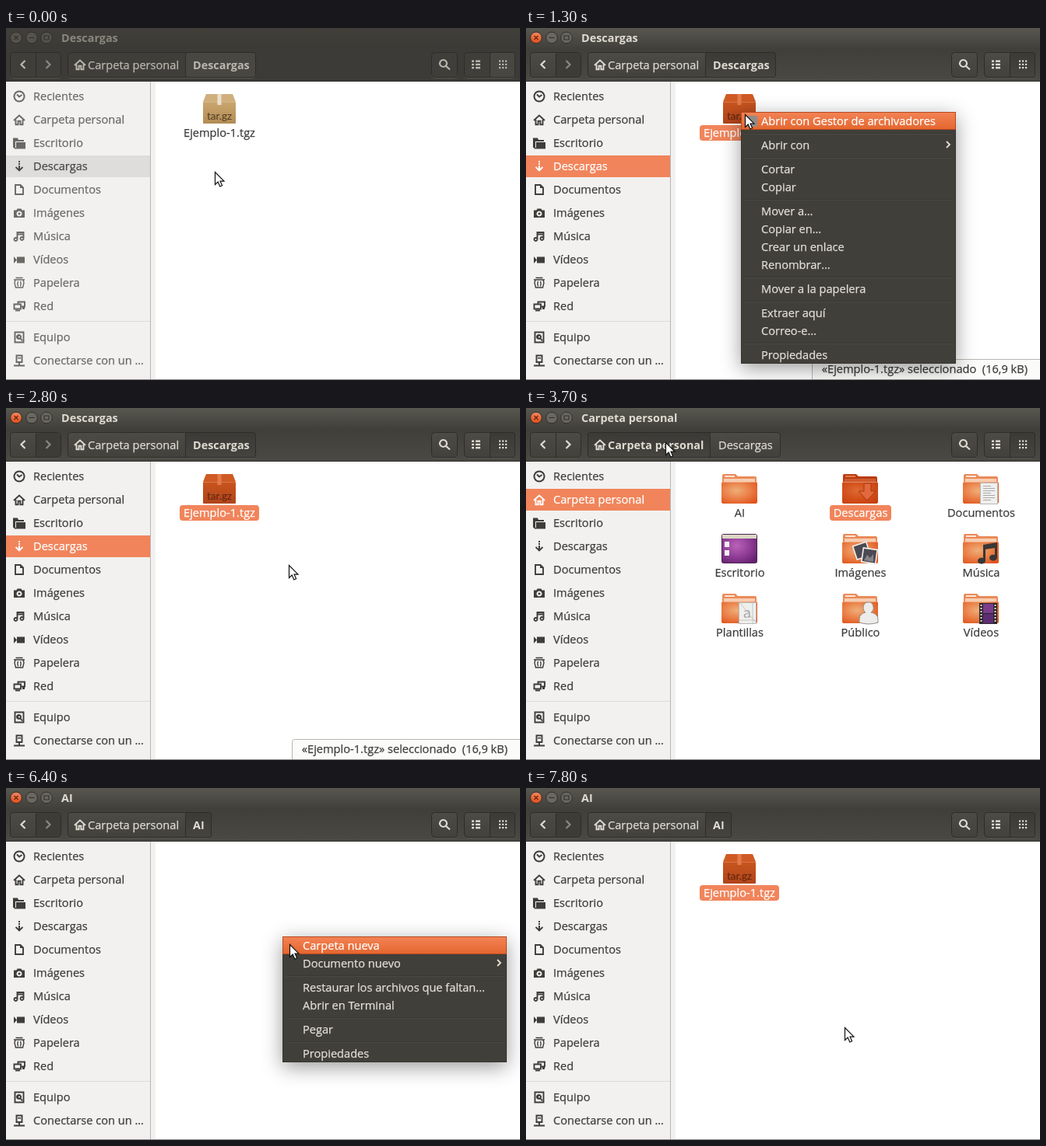
Write an HTML page that moves like this. It is 660 by 453 pixels and loops after 8000 ms.

```html
<!DOCTYPE html>
<html lang="es">
<head>
<meta charset="utf-8">
<title>Gestor de archivos</title>
<style>
html, body { margin: 0; width: 100%; height: 100%; overflow: hidden; background: #fff; }
svg { display: block; width: 660px; height: 453px; }
text { font: 14.6px "Open Sans", "Noto Sans", sans-serif; white-space: pre; stroke-width: .25; }
.b { font-weight: 700; font-size: 14.4px; stroke-width: 0; }
.m { text-anchor: middle; }
.e { text-anchor: end; }
.line { fill: none; stroke: currentColor; }
</style>
</head>
<body>
<svg viewBox="0 0 660 453" xmlns="http://www.w3.org/2000/svg">
  <defs id="defs"></defs>
  <g id="stage"></g>
</svg>
<script>
const LOOP = 8000, STEP = 100;
const DARK = '#3c3b37', ORANGE = '#f1845b';

// ---- helpers
const rect = (x, y, w, h, fill, more = '') =>
  `<rect x="${x}" y="${y}" width="${w}" height="${h}" fill="${fill}" ${more}/>`;
const path = (d, fill, more = '') => `<path d="${d}" fill="${fill}" ${more}/>`;
const line = (d, width = 2, more = '') => `<path class="line" d="${d}" stroke-width="${width}" ${more}/>`;
const text = (x, y, s, fill, cls = '') =>
  `<text x="${x}" y="${y}" fill="${fill}" stroke="${fill}" class="${cls}">${s}</text>`;
const at = (x, y, body, more = '') => `<g transform="translate(${x} ${y})" ${more}>${body}</g>`;
const stops = colors => colors.map((c, i) =>
  `<stop offset="${i / (colors.length - 1)}" stop-color="${c}"/>`).join('');
const grad = (id, ...colors) =>
  `<linearGradient id="${id}" x2="0" y2="1">${stops(colors)}</linearGradient>`;
const glowGrad = (id, ...colors) =>
  `<radialGradient id="${id}" cx=".42" cy=".4" r=".72">${stops(colors)}</radialGradient>`;

document.getElementById('defs').innerHTML =
  grad('title', '#58574f', '#403f3a') + grad('titleOff', '#403f3a', '#3b3a36') +
  grad('bar', '#403f3a', '#4a4943') + grad('btn', '#4c4b45', '#42413c') +
  grad('pressed', '#3b3a36', '#45443f') +
  grad('close', '#f58a63', '#dd4c1b') + grad('hot', '#f38355', '#e4662f') +
  grad('box', '#caa56e', '#b28c54') + grad('boxSel', '#c9551f', '#b0441a') +
  glowGrad('folder', '#f0ae79', '#ea824a', '#e0541c') +
  glowGrad('folderSel', '#de6a33', '#d4511c', '#c6410f') +
  glowGrad('desk', '#bb62b8', '#93409a', '#65206f');

// ---- sidebar: [label, row centre, stroked path, filled path]
const HOME = 'M1 9 8 2.5 15 9M3.5 8V14.2H6.6V9.8H9.4V14.2H12.5V8';
const PLACES = [
  ['Recientes', 88, 'M8 1.5a6.5 6.5 0 1 0 .01 0M5 5.5 8 8.5 11.5 6', ''],
  ['Carpeta personal', 118, HOME, ''],
  ['Escritorio', 148, '', 'M0 1.5H6L7 4H14V6H3V14H0ZM4 7H16V15.5H1.5V14H4Z'],
  ['Descargas', 178, 'M3.5 9 8 13.5 12.5 9', 'M7 1h2v2h-2zM7 4h2v2h-2zM7 7h2v6h-2z'],
  ['Documentos', 208, 'M3 2H9.5L13 5.5V14H3Z', 'M9 2V6H13Z'],
  ['Imágenes', 238, '', 'M1 4.5H4.5L5.5 2.5H10.5L11.5 4.5H15V14H1ZM8 5.5a3.5 3.5 0 1 0 .01 0ZM8 7.5a1.5 1.5 0 1 0 .01 0Z'],
  ['Música', 268, 'M5.5 12V3H13.5V10.5M5.5 5.5H13.5M3.5 10a2 2 0 1 0 .01 0M11.5 9a2 2 0 1 0 .01 0', ''],
  ['Vídeos', 298, '', 'M5 4.5H15V12.5H5ZM1 4 5 8.5 1 13Z'],
  ['Papelera', 328, 'M1 4H15M3.5 1.5H12.5M3 4 2 8 3.5 14H12.5L14 8 13 4M6.5 6Q5 9.5 6.5 12.5M9.5 6Q11 9.5 9.5 12.5', ''],
  ['Red', 358, 'M6.5 5V2.5H15V8.5H11M1.5 5.5H10V11.5H1.5Z', 'M3 12.5H9V14.5H3ZM12 9H15V12H12Z'],
  ['Equipo', 398, 'M2.5 1.5H13.5V14.5H2.5ZM9 9 12 12.5', 'M7.5 4a3.5 3.5 0 1 0 .01 0ZM8 6.5a1 1 0 1 0 .01 0Z'],
  ['Conectarse con un …', 428, 'M4.5 1.5H11.5V10H4.5ZM8 10V13.5M1 14.5H15', 'M6 4H10V5.5H6Z'],
];

function sidebar(active, focus) {
  let out = rect(0, 69, 192, 384, '#f2f1f0') + rect(185, 69, 1, 383, '#bab6b2') +
    rect(0, 377, 185, 1, '#dcdad8');
  for (const [label, y, stroke, fill] of PLACES) {
    const on = label === active;
    const color = !focus ? (on ? '#4a4845' : '#6b6966') : on ? '#fff' : '#3f3d3a';
    if (on) out += rect(0, y - 14, 185, 28, focus ? ORANGE : '#dfdddc');
    out += at(9, y - 8, line(stroke, label === 'Papelera' ? 1.4 : 1.9) +
      path(fill, 'currentColor', 'fill-rule="evenodd"'), `color="${color}"`);
    out += text(35, y + 5, label, color);
  }
  return out;
}

// ---- header
function group(x, w, focus, pressedX, pressedW) {
  return rect(x + .5, 32.5, w - 1, 32, 'none', 'rx="4" stroke="#59584f"') +
    rect(x + .5, 31.5, w - 1, 32, focus ? 'url(#btn)' : '#3f3e3a', 'rx="4" stroke="#2d2c29"') +
    (pressedW ? rect(pressedX + .5, 31.5, pressedW - 1, 32, focus ? 'url(#pressed)' : '#484741', 'rx="3" stroke="#2d2c29"') : '');
}

function header(place, focus) {
  const fg = focus ? '#dfdbd2' : '#bbb7ae', dim = '#8b887f';
  const home = place === 'Carpeta personal';
  let out = rect(0, 0, 660, 27, focus ? 'url(#title)' : 'url(#titleOff)') +
    rect(0, 27, 660, 42, focus ? 'url(#bar)' : DARK) + rect(0, 68, 660, 1, '#2f2e2b');
  [13, 33, 52].forEach((x, i) => {
    const hot = focus && !i;
    out += `<circle cx="${x}" cy="12.5" r="7.3" fill="${hot ? 'url(#close)' : focus ? '#69675f' : '#55534c'}" stroke="#2f2e2a"/>`;
    const mark = ['M-2.5-2.5 2.5 2.5M2.5-2.5-2.5 2.5', 'M-3.5 0H3.5', 'M-3-2.5H3V2.5H-3Z'][i];
    out += at(x, 12.5, line(mark, 1.2), `color="${hot ? '#6d2209' : '#33322e'}"`);
  });
  out += text(71, 18, place, focus ? '#dfdbd2' : '#8a867e', 'b');

  out += group(5, 66, focus) + rect(38, 32, 1, 31, '#2d2c29');
  if (!home && focus) out += rect(39, 32, 31, 31, '#3d3c37', 'rx="3"');
  out += at(0, 0, line('M24.5 42 19.5 47 24.5 52', 2.2), `color="${fg}"`) +
    at(0, 0, line('M51.5 42 56.5 47 51.5 52', 2.2), `color="${home ? fg : dim}"`);

  out += home ? group(79, 248, focus, 79, 158)
    : place === 'AI' ? group(79, 185, focus, 230, 34) : group(79, 242, focus, 230, 91);
  out += at(87, 39, line(HOME, 1.9), `color="${fg}"`) +
    text(105, 53, 'Carpeta personal', fg, home ? 'b' : '') +
    (home ? text(247, 53, 'Descargas', fg) : text(240, 53, place, fg, 'b'));

  out += group(546, 34, focus) + group(588, 66, focus, 621, 33);
  out += at(0, 0, line('M561.5 41a4.5 4.5 0 1 0 .01 0M565 49 570 53.5', 2.1), `color="${fg}"`);
  for (const y of [41.5, 45.8, 50]) {
    out += rect(598, y, 3, 2.4, fg) + rect(603, y, 6, 2.4, fg);
    for (const x of [633, 637, 641]) out += rect(x, y, 2.2, 2.2, fg);
  }
  return out;
}

// ---- icons
function label(cx, y, s, sel, half) {
  return (sel ? rect(cx - half, y - 15, half * 2, 20, ORANGE, 'rx="4"') : '') +
    text(cx, y, s, sel ? '#fff' : '#3c3c3c', 'm');
}
const glow = hover => hover ? 'style="filter:brightness(1.15)"' : '';

function archive(sel, hover) {
  const [top, front, tape, ink] = sel
    ? ['#d05a24', 'url(#boxSel)', '#e27a4c', '#5b2410'] : ['#d0af7d', 'url(#box)', '#eadfca', '#4d3c24'];
  return at(253, 85,
    path('M4 0H38L42 10H0Z', top) + rect(0, 10, 42, 28, front, 'rx="1"') +
    rect(0, 10, 42, 1, '#fff', 'opacity=".2"') + rect(18.5, 0, 5, 14, tape) +
    `<text x="21" y="33" class="m" fill="${ink}" style="font:13.5px Lato,sans-serif">tar.gz</text>`, glow(hover)) +
    label(274, 140, 'Ejemplo-1.tgz', sel, 51);
}

const page = rect(22.5, 11.5, 22, 27, '#efefee', 'stroke="#b9b7b4"');
const photo = (x, y, turn) => rect(-8, -9, 18, 18, '#4b4a52',
  `stroke="#f1efec" stroke-width="1.6" transform="translate(${x} ${y}) rotate(${turn})"`);
const rows = (n, f) => Array.from({ length: n }, (_, i) => f(i)).join('');
const EMBLEMS = {
  Descargas: path('M28 12H37V22H43L32 34 21 22H28Z', '#e2693d', 'stroke="#a8360c"'),
  Documentos: page + rows(7, i => rect(26, 15 + i * 3, i % 3 ? 15 : 10, 1, '#aaa')),
  'Imágenes': photo(24, 22, -18) + photo(34, 28, 8) + path('M28 34 32 27 36 31 40 26V36Z', '#85838a'),
  'Música': path('M26 14 44 11V31a5 4 0 1 1-3-4V18L29 20V35a5 4 0 1 1-3-4Z', '#383736'),
  Plantillas: page + `<text x="33" y="31" class="m" fill="#a5a3a0" style="font:20px Lato,sans-serif">a</text>` +
    path('M23 34H44M40 12V38M24 12 44 37', 'none', 'stroke="#c9c7c4"'),
  'Público': path('M33 11a6 7 0 0 1 4 13Q46 26 46 33V37Q34 41 22 37V33Q22 26 30 24A6 7 0 0 1 33 11Z', '#eeecea', 'stroke="#918e8b"'),
  'Vídeos': rect(21, 12, 23, 27, '#2b292b') + rect(26, 13, 13, 12, '#7b3c8c') + rect(26, 26, 13, 12, '#5d2c73') +
    rows(6, i => rect(22.5, 14 + i * 4, 2, 2, '#ddd') + rect(40.5, 14 + i * 4, 2, 2, '#ddd')),
};

function folder(name, cx, y, sel, hover) {
  let art;
  if (name === 'Escritorio') {
    art = rect(.5, .5, 45, 37, 'url(#desk)', 'rx="2" stroke="#4a2450"') + rect(1, 1, 44, 5, '#dcd8c4') +
      rect(4, 10, 6, 7, '#f3eef3') + rect(4, 21, 6, 7, '#f3eef3');
  } else {
    art = path('M1 37V2Q1 0 3 0H18L21 3H43Q45 3 45 5V37Z', sel ? '#b93c10' : '#ea8a58') +
      rect(4, 2, 13, 2, sel ? '#e57b4f' : '#fbe3d3') + rect(3, 6, 40, 6, sel ? '#d05a2c' : '#f8cdb0') +
      rect(0, 10, 46, 28, sel ? 'url(#folderSel)' : 'url(#folder)', 'rx="2"') +
      rect(1, 10, 44, 1, '#fff', 'opacity=".35"') + (EMBLEMS[name] || '');
  }
  return at(cx - 23.5, y, art, glow(hover)) + label(cx, y + 55, name, sel, name === 'AI' ? 13 : 39.5);
}

const FOLDERS = ['AI', 'Descargas', 'Documentos', 'Escritorio', 'Imágenes', 'Música', 'Plantillas', 'Público', 'Vídeos'];
const homeGrid = (selected, hover) => FOLDERS.map((name, i) =>
  folder(name, 274.5 + i % 3 * 155, 85 + Math.floor(i / 3) * 77, name === selected, name === hover)).join('');

function status(x, s) {
  return path(`M${x + .5} 453V429.5Q${x + .5} 426.5 ${x + 3.5} 426.5H661V453Z`, '#fbfbfa', 'stroke="#b9b6b2"') +
    text(644, 444, s, '#3c3c3c', 'e');
}

// ---- context menus: [label, row centre]
const FILE_MENU = { x: 276, y: 108, w: 276, h: 324, sub: 'Abrir con', seps: [135, 166, 220, 320, 351, 405], items: [
  ['Abrir con Gestor de archivadores', 120], ['Abrir con', 151], ['Cortar', 182], ['Copiar', 205],
  ['Mover a…', 236], ['Copiar en…', 259], ['Crear un enlace', 282], ['Renombrar…', 305],
  ['Mover a la papelera', 336], ['Extraer aquí', 367], ['Correo-e…', 390], ['Propiedades', 421]] };
const BLANK_MENU = { x: 355, y: 191, w: 288, h: 162, sub: 'Documento nuevo', seps: [241, 295, 326], items: [
  ['Carpeta nueva', 203], ['Documento nuevo', 226], ['Restaurar los archivos que faltan...', 257],
  ['Abrir en Terminal', 280], ['Pegar', 311], ['Propiedades', 342]] };

function menu({ x, y, w, h, sub, seps, items }, [px, py], opacity) {
  let out = rect(x + .5, y + .5, w - 1, h - 1, '#413f3a',
    'stroke="#35342f" style="filter:drop-shadow(0 6px 13px rgba(0,0,0,.4))"');
  for (const s of seps) out += rect(x + 4, s, w - 8, 1, '#393833') + rect(x + 4, s + 1, w - 8, 1, '#4a4943');
  for (const [name, cy] of items) {
    const hot = px >= x && Math.abs(cy - py) < 11.5;
    if (hot) out += rect(x + .5, cy - 11.5, w - 1, 22, 'url(#hot)', 'stroke="#b8491f"');
    out += text(x + 26, cy + 5, name, hot ? '#fff' : '#e3dfd6');
    if (name === sub) out += at(x + w - 12, cy - 1, line('M0-4 4 0 0 4', 1.8), 'color="#e3dfd6"');
  }
  if (x === FILE_MENU.x) out += rect(283, 113, 14, 14, '#8f8d88', 'rx="2"');
  return `<g opacity="${opacity}">${out}</g>`;
}

// ---- pointer: [time, x, y]
const MOVES = [
  [100, 268, 185], [700, 274, 106], [1200, 274, 106], [1300, 281, 111], [2100, 363, 202],
  [2900, 363, 202], [3500, 179, 44], [3800, 179, 44], [4400, 276, 110], [5000, 276, 110],
  [5100, 277, 116], [5500, 353, 189], [6300, 353, 189], [6400, 364, 201], [7000, 409, 308],
];

function pointer(t) {
  const i = MOVES.findIndex(m => m[0] > t);
  if (i === 0) return MOVES[0].slice(1);
  if (i < 0) return MOVES.at(-1).slice(1);
  const [a, x, y] = MOVES[i - 1], [b, u, v] = MOVES[i];
  const k = (t - a) / (b - a), e = (k + k * k * (3 - 2 * k)) / 2;
  return [Math.round(x + (u - x) * e), Math.round(y + (v - y) * e)];
}

const arrow = ([x, y]) => at(x, y,
  path('M.5.5V16.5L4.2 13 6.8 19 9.6 17.8 7.1 12.2H12Z', '#fff', 'stroke="#111" stroke-width="1.2"'));

function scene(t) {
  const pos = pointer(t), focus = t >= 900;
  const place = t < 3600 ? 'Descargas' : t < 4700 ? 'Carpeta personal' : 'AI';
  const over = pos[0] > 251 && pos[0] < 297 && pos[1] > 84 && pos[1] < 146;
  let out = rect(0, 0, 660, 453, '#fff') + sidebar(place, focus);

  if (place === 'Descargas') out += archive(focus, over && !focus);
  if (place === 'Carpeta personal') out += homeGrid(t < 4500 ? 'Descargas' : 'AI', over && t < 4500 && 'AI');
  if (t >= 7800) out += archive(true, false);

  if (t >= 900 && t < 3600) out += status(367, '«Ejemplo-1.tgz» seleccionado  (16,9 kB)');
  if (t >= 4500 && t < 4800) out += status(316, '«AI» seleccionado  (que contiene 0 elementos)');
  out += rect(0, 452, 660, 1, '#8c8a87') + header(place, focus);

  if (t >= 1000 && t < 2800) out += menu(FILE_MENU, pos, t < 1100 ? .6 : 1);
  if (t >= 5900 && t < 7600) out += menu(BLANK_MENU, pos, t < 6000 ? .6 : 1);
  return out + arrow(pos);
}

const stage = document.getElementById('stage');
const start = performance.now();
let shown = -1;

function tick() {
  const t = Math.floor((performance.now() - start) % LOOP / STEP) * STEP;
  if (t !== shown) stage.innerHTML = scene(shown = t);
  requestAnimationFrame(tick);
}
tick();
</script>
</body>
</html>
```
